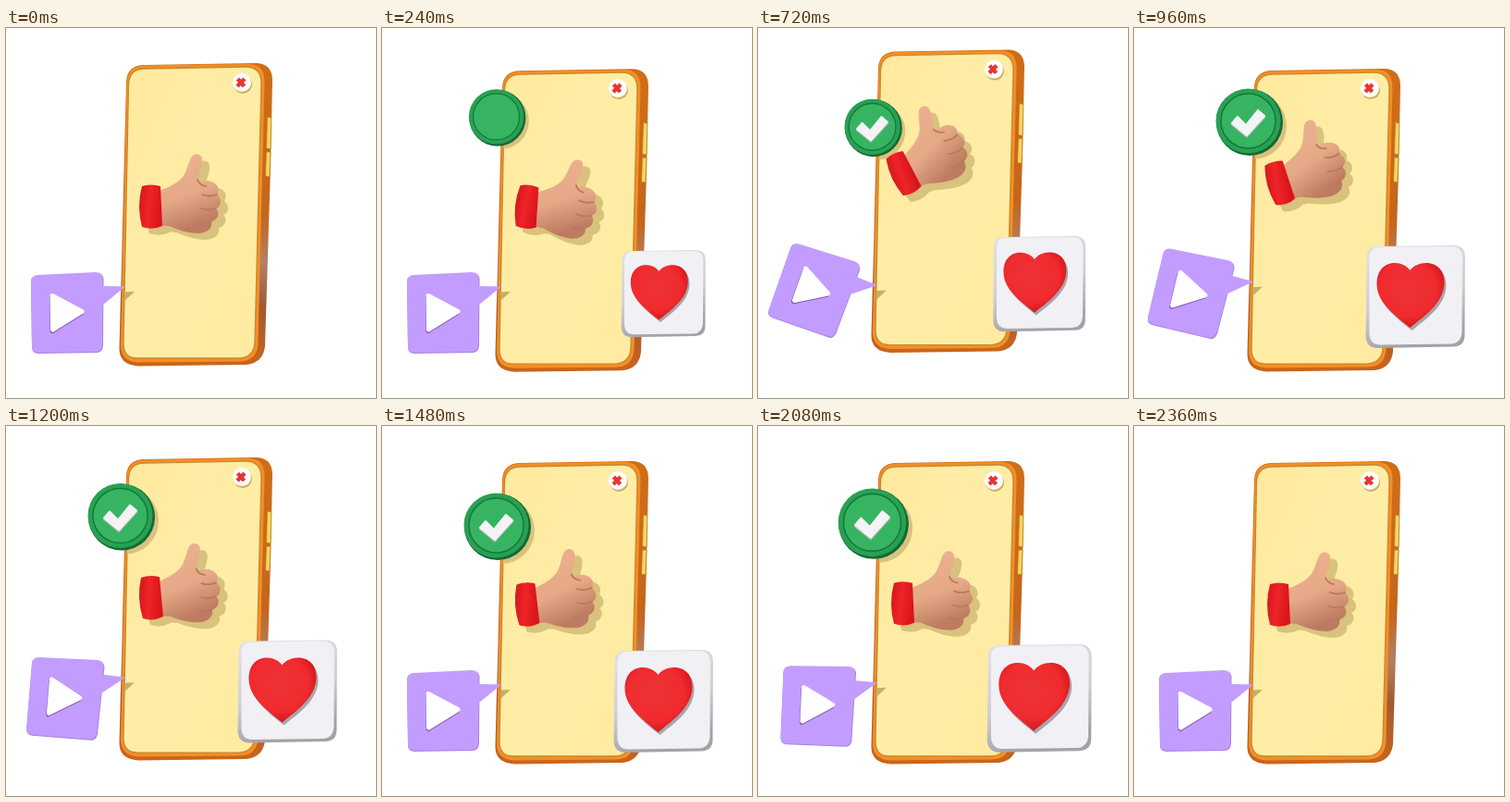
These frames come from a looping animation (400x400 px, 2400 ms). An HTML page:

```html
<!DOCTYPE html>
<html lang="en">
<head>
<meta charset="utf-8">
<title>Phone reactions</title>
<style>
html, body { margin: 0; width: 100%; height: 100%; overflow: hidden; background: #fff; }
svg { display: block; width: 100vw; height: 100vh; }
</style>
</head>
<body>
<svg viewBox="0 0 400 400">
  <defs>
    <linearGradient id="side" x1="0" y1="0" x2="0" y2="1">
      <stop offset="0" stop-color="#cf6d17"/><stop offset=".5" stop-color="#c4661c"/>
      <stop offset=".66" stop-color="#b08068"/><stop offset=".8" stop-color="#a05a34"/>
      <stop offset="1" stop-color="#c9661a"/>
    </linearGradient>
    <linearGradient id="glass" x1="0" y1="0" x2="1" y2="1">
      <stop offset="0" stop-color="#ffe99e"/><stop offset=".5" stop-color="#ffeda6"/><stop offset="1" stop-color="#ffeba0"/>
    </linearGradient>
    <linearGradient id="skin" x1="0" y1="0" x2=".3" y2="1">
      <stop offset="0" stop-color="#edb291"/><stop offset=".6" stop-color="#e6a988"/><stop offset="1" stop-color="#bd7b60"/>
    </linearGradient>
    <linearGradient id="cuff" x1="0" y1="0" x2="1" y2=".2">
      <stop offset="0" stop-color="#d3161b"/><stop offset=".5" stop-color="#ee2428"/><stop offset="1" stop-color="#d9151b"/>
    </linearGradient>
    <radialGradient id="love" cx=".45" cy=".4" r=".65">
      <stop offset="0" stop-color="#ec3438"/><stop offset=".65" stop-color="#f02b2f"/><stop offset="1" stop-color="#cc1219"/>
    </radialGradient>
    <linearGradient id="tileEdge" x1="0" y1="0" x2=".3" y2="1">
      <stop offset="0" stop-color="#e2e2e6"/><stop offset=".6" stop-color="#cfcfd4"/><stop offset="1" stop-color="#a2a2a8"/>
    </linearGradient>
    <path id="screen" d="M150 44L259 42Q276 42 276 60L269 340Q268 356 252 357L142 357Q127 357 127 341L132.500 61Q133 44 150 44Z"/>
    <path id="cuffShape" d="M147 171Q156 168 167 171L169 214Q158 219 147 215Q141 193 147 171Z"/>
    <path id="fist" d="M164 177C176 172 188 167 193 158C197 150 198 143 201 139C204 135 211 136 212 141C213 148 209 155 208 160C207 164 208 166 212 165.500C222 163 234 170 228 180C234 185 233 193 227 195C232 199 229 208 222 209C224 217 216 222 208 222C196 222 186 218 176 214L163 213Z"/>
    <path id="heart" d="M-6 -28C-14 -40 -42 -41 -42 -13C-42 8 -19 23 -6 34C7 23 31 8 31 -15C31 -41 2 -40 -6 -28Z"/>
    <path id="tick" d="M-18 2L-12 -5L-3 4L10 -12L17 -6L-2 15Z" stroke-width="2" stroke-linejoin="round"/>
    <path id="play" d="M50 289.500L82 306.500L50.500 326Z" stroke-width="5" stroke-linejoin="round"/>
    <clipPath id="inScreen"><use id="mask" href="#screen"/></clipPath>
  </defs>

  <g id="phone">
    <path fill="url(#side)" d="M148 40L270 38Q288 38 288 57L286 150L280 344Q278 362 260 364L143 365.500Q122 364 122.500 346L130 58Q131 41 148 40Z"/>
    <path fill="#f98d22" d="M150 40.500L262 39Q280 39 279.500 59L272.500 342Q271 360 253 360.500L142 361.500Q123.500 360 124 342L130.500 60Q131 41 150 40.500Z"/>
    <path d="M282.500 96L287 97L286 131L281.500 130ZM281.500 134L286 134L285 161L280.500 160Z" fill="#f9d45e" stroke="#b77a20" stroke-width=".7"/>
    <use href="#screen" fill="url(#glass)" stroke="#c08b34" stroke-width="1.300"/>
    <circle cx="256" cy="61" r="10" fill="#cfae60"/>
    <circle cx="255" cy="59" r="10" fill="#fff"/>
    <path d="M250.500 55L257.500 63M258 55L250 63" stroke="#e63731" stroke-width="4.400" fill="none"/>
  </g>

  <g clip-path="url(#inScreen)" fill="#d9c27d">
    <g id="handShade"><use href="#cuffShape"/><use href="#fist"/></g>
    <circle id="badgeShade" r="36"/>
    <path id="tailShade" d="M118 286L139 285L127 296L118 300Z" fill="#c9ad62"/>
  </g>

  <g id="hand">
    <use href="#fist" fill="url(#skin)"/>
    <path d="M207 164Q209 170 216 171M212 180Q220 183 228 180M211 195Q219 198 227 195M207 209Q215 212 222 209" fill="none" stroke="#b97a5e" stroke-width="1.800" stroke-linecap="round"/>
    <use href="#cuffShape" fill="url(#cuff)"/>
  </g>

  <g id="bubble">
    <path fill="#a680e2" d="M35 268L98 265Q105 265 105.500 271L105 344Q104 351 98 351L35 352Q28 352 28 345L27 274Q27 268 35 268Z"/>
    <path fill="#c29dff" d="M34 267L97 264Q104 264 104.500 270L104.500 279L129 279.500L104.500 299.500L104 343Q103.500 349.500 97 350L35 351Q28 351 28 344L27 274Q27 268 34 267Z"/>
    <use href="#play" x="-.5" y="1.500" fill="#8058b8" stroke="#8058b8"/>
    <use href="#play" fill="#fff" stroke="#fff"/>
  </g>

  <g id="badge">
    <circle cx="1" cy="1" r="36" fill="#126936"/>
    <circle cx="-.5" cy="-.5" r="35" fill="#29a053"/>
    <circle cx="-.5" cy="-.5" r="29.500" fill="#37b462" stroke="#147a3c" stroke-width="1.500"/>
    <g id="check">
      <use href="#tick" y="1.500" fill="#a9b8ae" stroke="#a9b8ae"/>
      <use href="#tick" fill="#f4f3f6" stroke="#f4f3f6"/>
    </g>
  </g>

  <g id="tile">
    <path fill="url(#tileEdge)" d="M-41 -54L41 -55Q53 -55 53.500 -43L53 42Q53 54 41 54.500L-41 56Q-53 56 -54 44L-53 -42Q-53 -54 -41 -54Z"/>
    <path fill="#f1f0f4" d="M-38 -53L38 -54Q50 -54 50.500 -42L50 39Q49 51 38 51.500L-38 52.500Q-49 52.500 -50 41L-50 -41Q-50 -53 -38 -53Z"/>
    <use href="#heart" x="2" y="3" fill="#a9a4aa"/>
    <use href="#heart" fill="url(#love)"/>
  </g>
</svg>
<script>
const LOOP = 2400, STEP = 40;
const place = (id, value) => document.getElementById(id).setAttribute("transform", value);

// Progress from a to b, clamped to 0..1.
const part = (t, a, b) => Math.min(1, Math.max(0, (t - a) / (b - a)));
const smooth = u => u * u * (3 - 2 * u);
const easeOut = u => 1 - (1 - u) ** 3;
const backOut = u => 1 + 2.7 * (u - 1) ** 3 + 1.7 * (u - 1) ** 2;

// Rises from a to b, then falls until c.
const pulse = (t, a, b, c) => smooth(part(t, a, b)) - smooth(part(t, b, c));
const lateBob = t => pulse(t, 1480, 1840, 2200);
const bob = t => pulse(t, 760, 1120, 1480) + lateBob(t);

// A ringing jump: dips, peaks at 560 ms, then settles.
function jump(t) {
  const x = (t - 560) / 250;
  if (x < -2 || x > 3) return 0;
  return x ? Math.sin(Math.PI * x) / (Math.PI * x) : 1;
}

// Pops in with a wobble, and swells a little before it shrinks away.
function pop(t, wobble) {
  const ring = t < 880 ? 1 + wobble * Math.cos((t - 400) / 640 * 2 * Math.PI) : 1;
  return easeOut(part(t, 100, 400)) * ring * backOut(1 - part(t, 1840, 2260));
}

function draw(now) {
  const t = Math.floor(now % LOOP / STEP) * STEP;

  const lift = `translate(0 ${-32 * jump(t)})`;
  place("phone", lift);
  place("mask", lift);

  const handY = -35 * pulse(t, 240, 720, 1400) - 5 * lateBob(t);
  const handTurn = 14 * pulse(t, 100, 400, 700) - 25 * pulse(t, 450, 720, 1300) - 4 * pulse(t, 1100, 1480, 1840);
  const turn = `rotate(${handTurn} 155 193)`;
  place("hand", `translate(0 ${handY}) ${turn}`);
  place("handShade", `translate(8 ${handY + 7}) ${turn}`);

  const bubbleY = -9 * bob(t) - 2 * pulse(t, 200, 600, 1000);
  const bubbleTurn = 20.5 * pulse(t, 400, 660, 1480) + 12.5 * lateBob(t);
  place("bubble", `translate(0 ${bubbleY}) rotate(${bubbleTurn} 129 280)`);
  place("tailShade", `translate(0 ${bubbleY})`);

  const badgeY = 108 - 20 * pulse(t, 40, 400, 760) - 12 * bob(t);
  const size = pop(t, .14);
  place("badge", `translate(124 ${badgeY}) scale(${size})`);
  place("badgeShade", `translate(${124 + 5 * size} ${badgeY + 5 * size}) scale(${size})`);
  place("check", `scale(${backOut(part(t, 385, 1000))})`);

  const tileY = 297 - Math.max(26 * pulse(t, 0, 560, 1120), 12 * bob(t));
  place("tile", `translate(304.5 ${tileY}) scale(${pop(t, .07)})`);

  requestAnimationFrame(draw);
}
draw(0);
</script>
</body>
</html>
```
